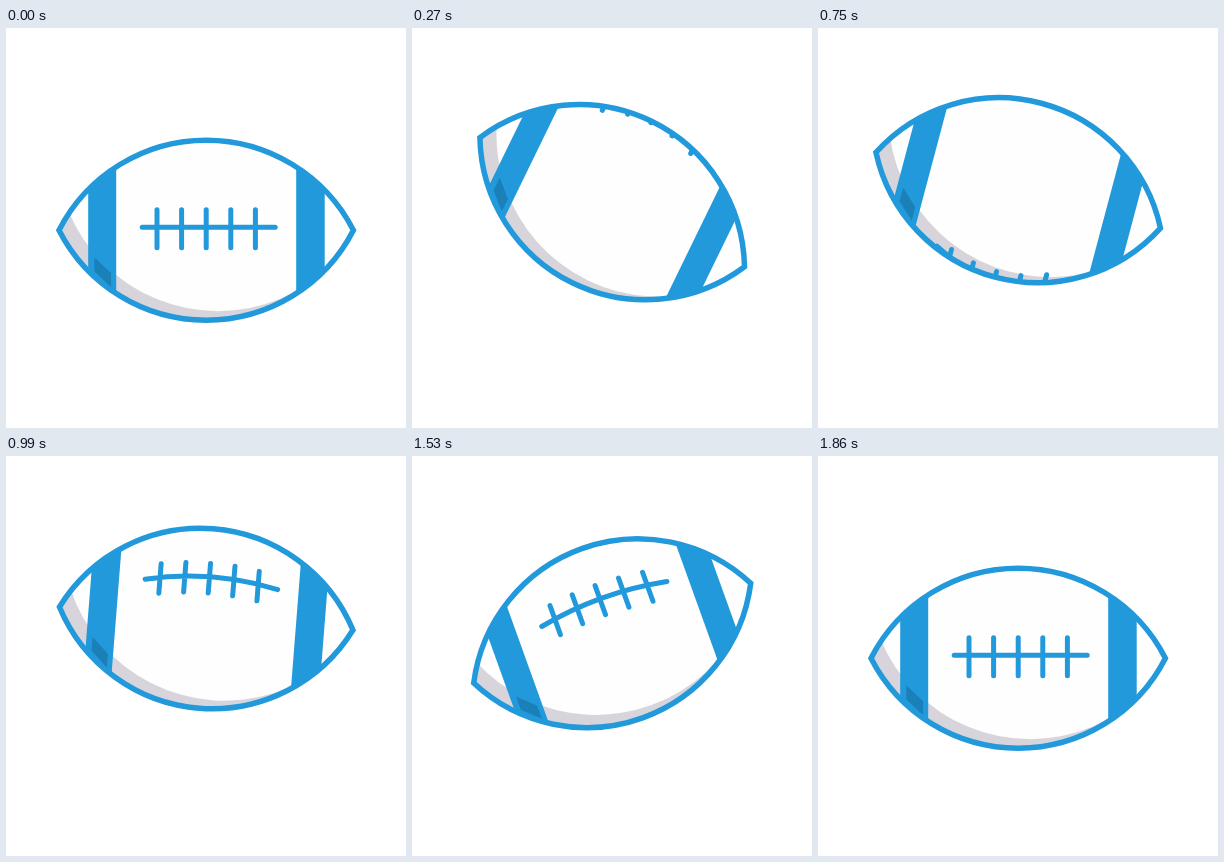
Recreate the animation shown at these times as an HTML page. Size 400 by 400 pixels, loop 4.42 s.

```html
<!DOCTYPE html>
<html lang="en">
<head>
<meta charset="utf-8">
<title>Spinning football</title>
<style>
  html, body { margin: 0; width: 100%; height: 100%; overflow: hidden; background: #fff; }
  svg { display: block; width: 100%; height: 100%; }
  .bar { fill: #2199db; }
  .line { fill: none; stroke: #2199db; stroke-width: 5.5; }
  #laces { stroke-width: 5; stroke-linecap: round; }
</style>
</head>
<body>
<svg viewBox="0 0 400 400">
  <defs>
    <path id="hull" d="M-147.2 0A165.4 165.4 0 0 1 147.2 0A165.4 165.4 0 0 1 -147.2 0Z"/>
    <clipPath id="inside"><use href="#hull"/></clipPath>
    <clipPath id="panel"><rect x="-112" y="-100" width="17" height="200"/></clipPath>
  </defs>
  <g id="ball">
    <g clip-path="url(#inside)">
      <use href="#hull" fill="#d7d5db"/>
      <circle cx="12" cy="-81" r="162" fill="#fefefe"/>
      <rect class="bar" x="-118" y="-100" width="28" height="200"/>
      <rect class="bar" x="90" y="-100" width="28.5" height="200"/>
      <path clip-path="url(#panel)" fill="#1b80b8" d="M-112 27L-95 43V57L-112 41Z"/>
      <path id="laces" class="line"/>
    </g>
    <use href="#hull" class="line"/>
  </g>
</svg>
<script>
  const LOOP = 4420, STEP = 30, MOVE_END = 1860;
  const HALF_TURN = 530, SPIN_END = 3 * HALF_TURN;

  // [time in ms, value]
  const lift = [[0, 0], [270, -28], [540, -38], [750, -40], [990, -39.7],
                [1290, -35], [1530, -25], [1620, -15.5], [MOVE_END, 0]];
  const tilt = [[0, 0], [270, 26], [360, 27.2], [540, 23.4], [750, 14.9], [990, 4.5],
                [1290, -9.7], [1530, -19.8], [1580, -20.5], [1620, -20.1], [MOVE_END, 0]];

  const ball = document.getElementById('ball');
  const laces = document.getElementById('laces');

  const rate = (a, b) => (b[1] - a[1]) / (b[0] - a[0]);

  // Slope at a key; zero at the ends and at turning points.
  function slope(keys, i) {
    if (i === 0 || i === keys.length - 1) return 0;
    const before = rate(keys[i - 1], keys[i]), after = rate(keys[i], keys[i + 1]);
    return before * after <= 0 ? 0 : 2 * before * after / (before + after);
  }

  function sample(keys, t) {
    let i = 0;
    while (i < keys.length - 2 && t > keys[i + 1][0]) i++;
    const [t0, v0] = keys[i], [t1, v1] = keys[i + 1];
    const d = t1 - t0, u = Math.min(1, (t - t0) / d), w = 1 - u;
    return v0 * w * w * (1 + 2 * u) + v1 * u * u * (3 - 2 * u)
         + d * u * w * (w * slope(keys, i) - u * slope(keys, i + 1));
  }

  // Laces wrapped around the ball, turned by a phase between -1/2 and 1/2.
  function lacePath(t) {
    const turn = Math.min(t, SPIN_END) / HALF_TURN;
    const angle = (turn - Math.round(turn)) * Math.PI;
    const s = Math.sin(angle);
    const mid = 97 * s - 3 * Math.cos(angle);
    const bend = 18.4 * s;
    const half = 19 * (1 - 0.55 * Math.abs(s));
    const rowY = x => mid - bend * (x / 66) ** 2;
    let d = `M-64 ${rowY(-66)}Q2 ${rowY(0) + bend} 69 ${rowY(66)}`;
    for (let k = -2; k <= 2; k++) {
      const x = k * 24.6, y = rowY(x) + 1.5 * Math.cos(angle);
      d += `M${x} ${y - half}V${y + half}`;
    }
    return d;
  }

  function draw(now) {
    const t = Math.min(MOVE_END, Math.floor(now % LOOP / STEP) * STEP);
    ball.setAttribute('transform',
      `translate(200.2 ${202.2 + sample(lift, t)}) rotate(${sample(tilt, t)})`);
    laces.setAttribute('d', lacePath(t));
  }

  const start = performance.now();
  function tick() {
    draw(performance.now() - start);
    requestAnimationFrame(tick);
  }
  tick();
</script>
</body>
</html>
```
